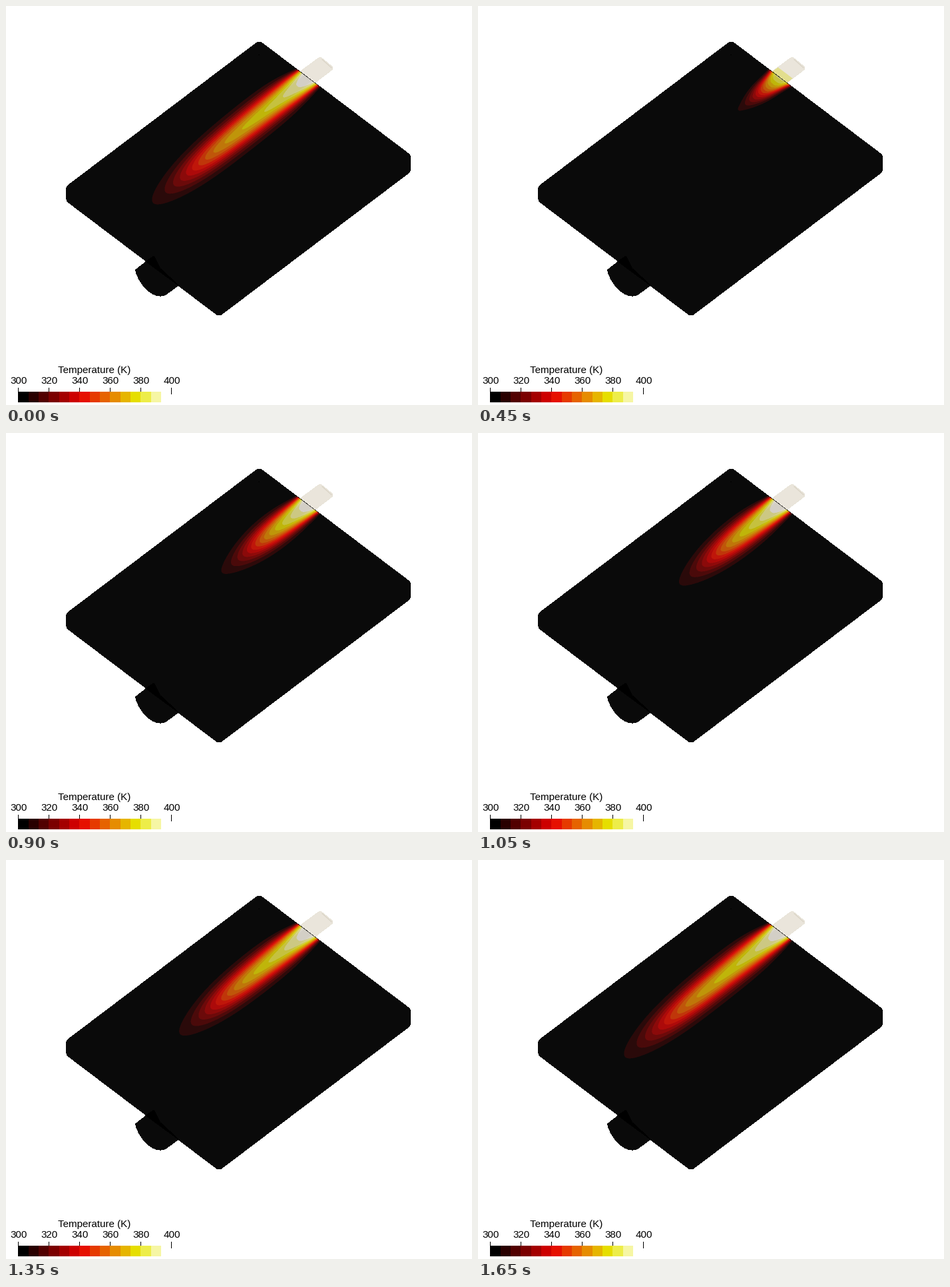
Write a matplotlib script that moves like this. It is 700 px wide and 600 px high and loops after 1800 ms.

```python
import numpy as np
import matplotlib.pyplot as plt
from matplotlib.animation import FuncAnimation
from matplotlib.patches import PathPatch, Rectangle
from matplotlib.path import Path

W, H, DPI = 700, 600, 100
FRAMES, INTERVAL = 12, 150
BANDS = 15
PLATE_GREY = np.array([10, 10, 10]) / 255
INLET = (454, 108)
FULL_REACH = 298
LEFT, RIGHT, TOP, BOTTOM = 200, 500, 70, 310


def black_body(t):
    stops = [0, 0.4, 0.8, 1]
    channels = ([0, 0.902, 0.902, 1], [0, 0, 0.902, 1], [0, 0, 0, 1])
    return np.stack([np.interp(t, stops, c) for c in channels], axis=-1)


PALETTE = black_body(np.arange(BANDS) / (BANDS - 1))

# Two samples per pixel each way; u runs along the flow, v across it.
px, py = np.meshgrid(np.arange(LEFT, RIGHT, 0.5) + 0.25 - INLET[0],
                     np.arange(TOP, BOTTOM, 0.5) + 0.25 - INLET[1])
u = -0.8 * px + 0.6 * py
v = 0.6 * px + 0.8 * py
down = np.maximum(u, 0)
along = u + 0.29 * v * np.exp(-down / 40)
run = np.maximum(along, 0)
away = 1 - np.exp(-run / 15)
offset = np.abs(v - 10 * (down / FULL_REACH) ** 1.7)
shade = 0.79 + 0.14 * np.clip((offset - 6) / 10, 0, 1) * np.exp(-(run / 160) ** 2)


def front_reach(frame):
    """Length of the hot plume; the loop opens on its last state."""
    progress = (frame - 1) % FRAMES / (FRAMES - 2)
    if frame == 0:
        progress = 1
    return 10 + (FULL_REACH - 10) * progress ** 0.92


def front_gap(reach):
    return (reach - along) / (reach / FULL_REACH) ** 0.4


def axis_heat(reach):
    front = 0.5 * (1 + np.tanh((front_gap(reach) - 68) / 62))
    return (0.68 + 0.32 * np.exp(-run / 90)) * front


def spread(reach):
    """Falloff across the flow, tapered at the tip while the plume is young."""
    young = 0.9 * np.exp(-reach / 60)
    taper = 0.8 * np.exp(-reach / 150 - np.maximum(front_gap(reach), 0) / 60)
    width = (18 + 3.5 * (1 - np.exp(-run / 45))) * (1 - young * away) * (1 - taper * away)
    power = 2 + 3 * np.exp(-run / 22)
    return np.exp(-(offset / width) ** power)


def paint(heat, light, base):
    band = np.clip(heat * BANDS, 0, BANDS - 1).astype(int)
    warm = np.array([1, 0.98, 0.935])
    rgb = np.clip(PALETTE[band] * light * warm + base, 0, 1)
    rows, cols = rgb.shape[0] // 2, rgb.shape[1] // 2
    return rgb.reshape(rows, 2, cols, 2, 3).mean(axis=(1, 3))


def plate_image(reach):
    return paint(axis_heat(reach) * spread(reach), shade[..., None], PLATE_GREY)


def pipe_image(reach):
    return paint(axis_heat(reach), 0.9, PLATE_GREY / 2)


def rounded(points, radius):
    pts = np.array(points, float)
    verts, codes = [], []
    for before, corner, after in zip(np.roll(pts, 1, 0), pts, np.roll(pts, -1, 0)):
        for end in (before, after):
            step = (end - corner) / np.hypot(*(end - corner))
            verts.append(corner + radius * step)
        verts.insert(-1, corner)
        codes += [Path.LINETO, Path.CURVE3, Path.CURVE3]
    codes[0] = Path.MOVETO
    return Path(verts + [verts[0]], codes + [Path.CLOSEPOLY])


fig = plt.figure(figsize=(W / DPI, H / DPI), dpi=DPI, facecolor="white")
ax = fig.add_axes([0, 0, 1, 1])


def shape(path, color, z):
    return ax.add_patch(PathPatch(path, facecolor=color, lw=0, antialiased=False,
                                  zorder=z))


def box(x, y, w, h, color, z):
    ax.add_patch(Rectangle((x, y), w, h, facecolor=color, lw=0, antialiased=False,
                           zorder=z))


def heat_layer(image, clip, z):
    layer = ax.imshow(image, extent=(LEFT, RIGHT, BOTTOM, TOP), aspect="auto",
                      interpolation="nearest", zorder=z)
    layer.set_clip_path(clip)
    return layer


def label(x, y, text):
    ax.text(x, y, text, family="Liberation Sans", size=15.1 * 72 / DPI,
            ha="center", va="baseline", color="black")


outlet = Path([(211, 384), (194.5, 397), (200, 421), (224, 443), (240, 434),
               (259, 420), (211, 384)],
              [Path.MOVETO, Path.LINETO] + [Path.CURVE4] * 3
              + [Path.LINETO, Path.CLOSEPOLY])
shadow = Path([(210, 384), (222, 376), (232, 395), (259, 420), (210, 384)])

shape(outlet, PLATE_GREY, 1)
pipe = shape(rounded([(436, 103), (472, 76.5), (492.5, 93.5), (456, 121.5)], 4),
             "#e8e4d8", 1)
plate = shape(rounded([(380.3, 52.5), (608, 224.8), (608, 248.5), (320, 466.5),
                       (90.5, 292.8), (90.5, 271.9)], 5), PLATE_GREY, 3)
shape(shadow, "black", 5)
box(379, 73, 2, 1, "black", 5)

pipe_layer = heat_layer(pipe_image(FULL_REACH), pipe, 2)
plate_layer = heat_layer(plate_image(FULL_REACH), plate, 4)
ax.plot([475, 489], [80.5, 93], color="#d8d2c4", lw=0.8, zorder=3)

# Colour bar
edges = np.ceil(18 + 46 * np.arange(BANDS + 1) / 3 - 1e-6)
for x0, x1, color in zip(edges, edges[1:], PALETTE):
    box(x0, 580, x1 - x0, 16, color, 4)
for i in range(6):
    box(18 + 46 * i, 574, 1, 10, "black", 3)
    label(18.7 + 46.1 * i, 568.3, str(300 + 20 * i))
label(132.5, 552.3, "Temperature (K)")

ax.set_xlim(0, W)
ax.set_ylim(H, 0)
ax.axis("off")


def update(frame):
    reach = front_reach(frame)
    plate_layer.set_data(plate_image(reach))
    pipe_layer.set_data(pipe_image(reach))
    return plate_layer, pipe_layer


anim = FuncAnimation(fig, update, frames=FRAMES, interval=INTERVAL,
                     repeat=True, repeat_delay=0, blit=False)
plt.show()
```
